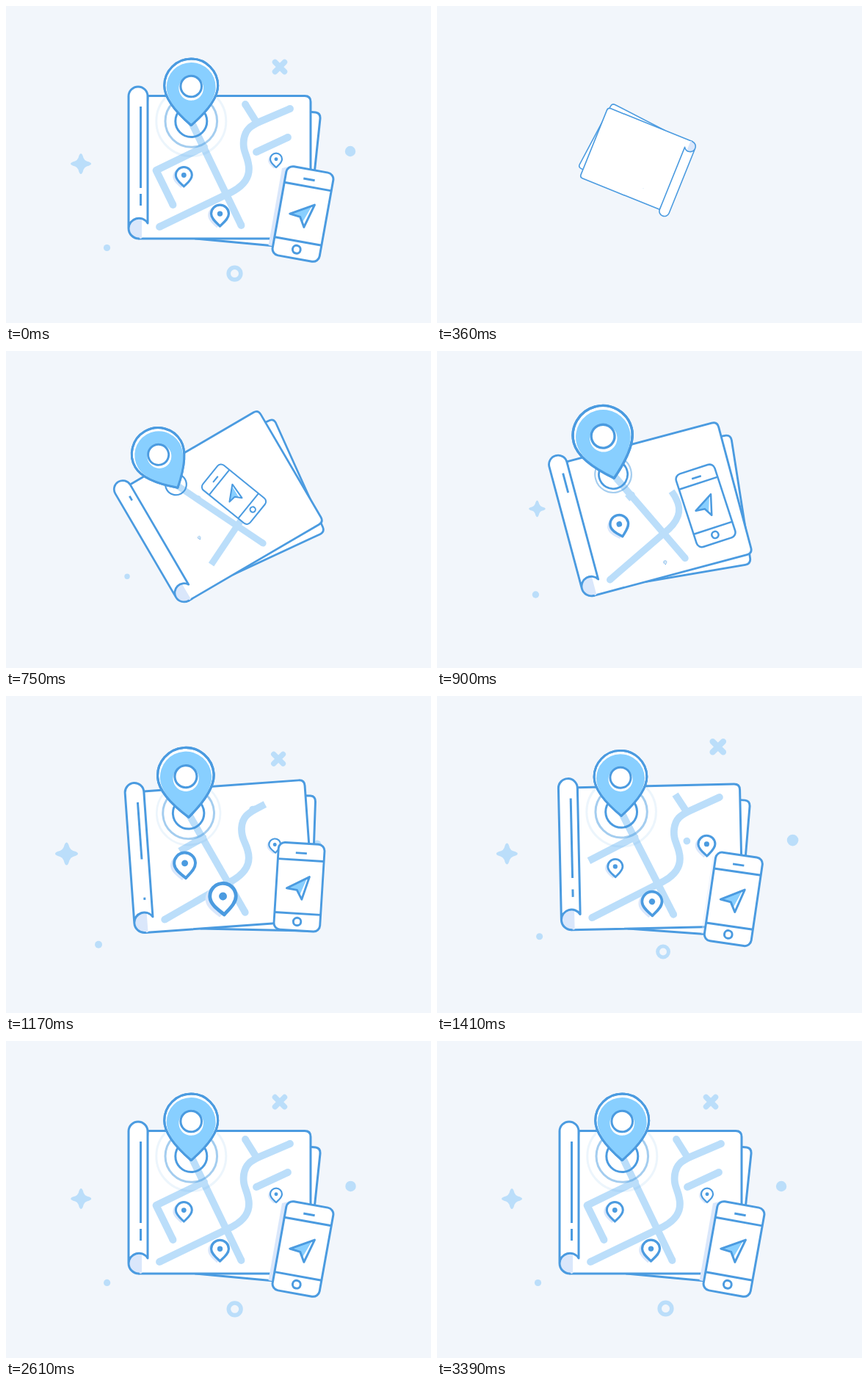
These frames come from a looping animation (579x432 px, 3510 ms). An HTML page:

```html
<!DOCTYPE html>
<html lang="en">
<head>
<meta charset="utf-8">
<title>Map and navigation</title>
<style>
  html, body { margin: 0; width: 100%; height: 100%; overflow: hidden; background: #f2f6fb; }
  svg { display: block; width: 100vw; height: 100vh; }
  .line { fill: none; stroke: #4b9be0; stroke-width: 3; stroke-linecap: round; stroke-linejoin: round; }
  .paper { fill: #fff; }
  .flat { stroke-linecap: butt; }
  .dot { fill: #4b9be0; }
  .sky { fill: #88cfff; }
  .shade { fill: #dae7fb; }
  .pale { fill: #bbdefa; }
  .road { fill: none; stroke: #bbdefa; stroke-width: 9.8; stroke-linejoin: round; }
  .mark { fill: none; stroke: #bbdefa; stroke-linecap: round; }
</style>
</head>
<body>
<svg viewBox="0 0 579 432">
  <defs>
    <path id="drop" d="M0 0C-4 -4 -11 -9 -11 -15.5A11 11 0 0 1 11 -15.5C11 -9 4 -4 0 0Z"/>
    <path id="bigDrop" d="M0 0C-14 -12 -36.5 -33 -36.5 -54A36.5 36.5 0 0 1 36.5 -54C36.5 -33 14 -12 0 0Z"/>
    <g id="pin">
      <use href="#drop" class="shade" x="-4" y="2"/>
      <use href="#drop" class="line paper"/>
      <circle class="dot" cy="-15.5" r="3.4"/>
    </g>
  </defs>

  <g class="decor"><circle class="pale" cx="137.5" cy="329.5" r="4.6"/></g>
  <g class="decor"><path class="pale" transform="translate(102 215)" d="M0 -14Q2 -14 3.5 -8Q5 -4.500 8 -3.500Q14 -2 14 0Q14 2 8 3.500Q5 4.500 3.500 8Q2 14 0 14Q-2 14 -3.500 8Q-5 4.500 -8 3.500Q-14 2 -14 0Q-14 -2 -8 -3.500Q-5 -4.500 -3.500 -8Q-2 -14 0 -14Z"/></g>
  <g class="decor"><path class="mark" d="M366.5 76.5L379.5 89.5M379.5 76.5L366.5 89.5" stroke-width="7.5"/></g>
  <g class="decor"><circle class="pale" cx="469" cy="198" r="7.2"/></g>
  <g class="decor"><circle class="mark" cx="311.5" cy="364.5" r="8.3" stroke-width="5.6"/></g>

  <g id="map">
    <path class="line paper" d="M258 317L401 330.3Q409 331 410 323L428 153.5Q428.5 146 422 145L400 143L240 250Z"/>
    <path class="line paper" d="M181 317H407Q415 317 415 309V130.5Q415 122.5 407 122.5H193Z"/>
    <g id="roads"></g>
    <g transform="translate(252.3 157)">
      <circle class="line ring" r="21.5"/>
      <circle class="line ring" r="35.3" opacity=".5"/>
      <circle class="line ring" r="47.5" opacity=".1"/>
    </g>
    <path class="paper" d="M167 303V123A13 13 0 0 1 193 123V296Q190 317 181 317A14 14 0 0 1 167 303Z"/>
    <path class="shade" d="M167 303A14 14 0 0 1 185 289V316.5H181A14 14 0 0 1 167 303Z"/>
    <path class="line" d="M181 317A14 14 0 0 1 167 303V123A13 13 0 0 1 193 123V296A14 14 0 0 0 167 303"/>
    <path id="crease" class="line flat" pathLength="1" d="M183.5 137V248"/>
    <path id="fold" class="line flat" pathLength="1" d="M183.5 272V256"/>
    <use id="pin1" href="#pin"/>
    <use id="pin2" href="#pin"/>
    <use id="pin3" href="#pin"/>
    <g id="marker">
      <use href="#bigDrop" class="line paper"/>
      <path class="sky" d="M0 -1.5C-14 -13 -33.5 -33 -33.5 -52A33.5 33.5 0 0 1 33.5 -52C33.5 -33 14 -13 0 -1.5Z"/>
      <circle class="paper" cy="-50.5" r="16.8"/>
      <circle class="line paper" cy="-53" r="14.3"/>
      <use href="#bigDrop" class="line"/>
    </g>
    <path id="shadow" class="shade" d="M384 219L376 221L357.5 326L366 328Z"/>
    <g id="phone">
      <rect class="line paper" x="-32.5" y="-61.5" width="65" height="123" rx="9"/>
      <path class="line flat" d="M-32.5 -38H32.5M-32.5 37.5H32.5M-7.8 -47.8H7.8"/>
      <circle class="line" cy="49" r="5.4"/>
      <path class="sky" d="M-17 2.5L10.5 -13.5L1.5 11L-3 4.5Z"/>
      <path class="line" d="M-17.5 2.7L13.5 -15L4.5 17.3L-3 4.5Z"/>
    </g>
  </g>
</svg>
<script>
const LOOP = 3510, STEP = 150;
const cx = 279.3, cy = 215;
const parts = [];
const $ = id => document.getElementById(id);

// Ease in and out between two times.
function smooth(t, from, to) {
  const p = Math.min(1, Math.max(0, (t - from) / (to - from)));
  return p * p * (3 - 2 * p);
}

// Remaining distance, 1 to 0, with a long soft landing.
function settle(t, from, tau) {
  return t < from ? 1 : 1 / (1 + 0.43 * (Math.exp((t - from) / tau) - 1));
}

// Straight rise that reaches 1 at time 0, then a damped swing around 1.
function bounce(t, rise, amp, freq = 0.0067) {
  return t < 0 ? Math.max(0, 1 + t / rise)
               : 1 + amp * Math.sin(freq * t) * Math.exp(-0.0032 * t);
}

const move = (el, x, y, size, turn = 0) =>
  el.setAttribute('transform', `translate(${x} ${y}) rotate(${turn}) scale(${size})`);
const trim = (el, p) => el.setAttribute('stroke-dasharray', `${p} 2`);
const show = (el, on) => { el.style.display = on ? '' : 'none'; };

// The map spins in about the middle of the stage.
parts.push(t => {
  const left = settle(t, 90, 205), size = Math.max(0, 1 - 1.03 * left);
  show($('map'), size > 0);
  $('map').setAttribute('transform',
    `translate(${cx} ${cy}) rotate(${-345 * left}) scale(${size}) translate(${-cx} ${-cy})`);
});

// Decorations fly out from behind it, one after another.
document.querySelectorAll('.decor').forEach((el, i) => parts.push(t => {
  const k = bounce(t - 885 - i * STEP, 690, 0.215);
  move(el, cx * (1 - k), cy * (1 - k), k);
}));

document.querySelectorAll('.ring').forEach((el, i) => parts.push(t => {
  const from = 275 + i * STEP;
  move(el, 0, 0, smooth(t, from, from + 718));
}));

function add(tag, attrs) {
  const el = document.createElementNS('http://www.w3.org/2000/svg', tag);
  for (const k in attrs) el.setAttribute(k, attrs[k]);
  return $('roads').appendChild(el);
}

// Roads draw with a flat tip; round caps close the finished ends.
function road(from, to, d) {
  const xy = d.match(/[\d.]+/g);
  const cap = ([x, y]) => add('circle', { class: 'pale', cx: x, cy: y, r: 4.9 });
  const line = add('path', { class: 'road', pathLength: 1, d });
  const head = cap(xy), tail = cap(xy.slice(-2));
  parts.push(t => {
    const p = smooth(t, from, to);
    trim(line, p);
    show(head, p > 0);
    show(tail, p > 0.99);
  });
}
road(430, 590, 'M252 157L320.5 299');
road(500, 900, 'M300 257L209 301');
road(480, 1430, 'M300 257C326 246 334 232 330 214C328 202 322 197 324 182C326 168 334 163 345 158L387 140');
road(696, 2012, 'M270 192L204.5 224L227.5 271');
road(1100, 1450, 'M341 158L326 134');
road(1400, 1950, 'M341 199L384 179');

parts.push(t => {
  trim($('crease'), smooth(t, 613, 1480));
  trim($('fold'), smooth(t, 951, 1713));
});

// Pins pop up from their tips.
function pin(id, x, y, size, grow) {
  parts.push(t => move($(id), x, y, size * grow(t)));
}
const pop = i => t => bounce(t - 870 - i * STEP, 145, 0.95);
pin('pin1', 242.3, 246, 1, pop(0));
pin('pin2', 291.5, 300, 1.09, pop(1));
pin('pin3', 368, 220, 0.73, pop(2));
pin('marker', 252.2, 162.5, 1, t => bounce(t - 700, 100, 0.38, 0.0049));

// The phone slides out sideways, then drops into the corner.
parts.push(t => {
  const left = settle(t, 424, 160), lift = settle(t, 788, 165);
  move($('phone'), 404.5 - 329 * left, 283.5 - 70 * lift, 1 - left, 10.2 - 120 * left);
  $('shadow').style.opacity = smooth(t, 1200, 1700);
});

// The loop opens on the finished picture, then cuts to an empty stage.
function draw(now) {
  const t = now % LOOP;
  for (const part of parts) part(t < 30 ? LOOP : t);
}
const start = performance.now();
function tick() {
  draw(performance.now() - start);
  requestAnimationFrame(tick);
}
draw(0);
requestAnimationFrame(tick);
</script>
</body>
</html>
```
